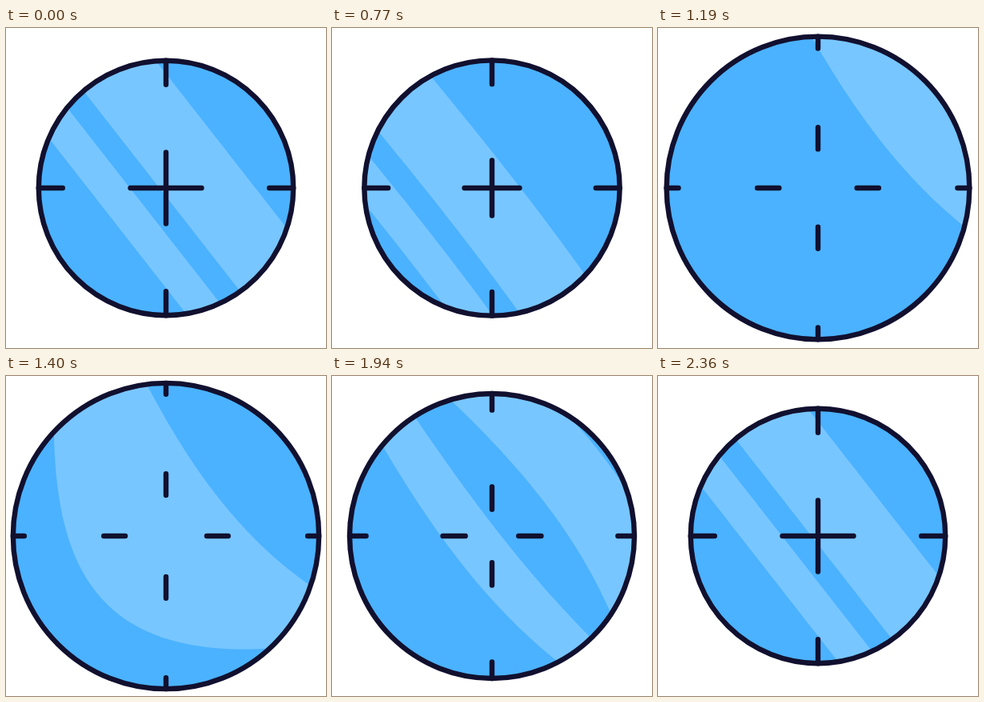
These frames come from a looping animation (400x400 px, 2390 ms). An HTML page with a canvas:

```html
<!DOCTYPE html>
<html lang="en">
<head>
<meta charset="utf-8">
<title>Scope</title>
<style>
  html, body { margin: 0; width: 100%; height: 100%; overflow: hidden; background: #fff; }
  canvas { display: block; width: 400px; height: 400px; }
</style>
</head>
<body>
<canvas id="stage" width="400" height="400"></canvas>
<script>
const ctx = document.getElementById('stage').getContext('2d');
const LOOP = 2390, STEP = 30, START = 500, SETTLED = 2360;
const INK = '#11102f', GLASS = '#4bb2ff', SHINE = '#78c6ff';
const CAP = 3.2;
const FAR = 215; // distance at which an edge lies outside the lens
const TILT = Math.atan2(0.788, 0.616);

const clamp = x => Math.min(1, Math.max(0, x));
const smooth = x => x * x * (3 - 2 * x);

// Timing curve cubic-bezier(.45, 0, .02, 1)
function ease(x) {
  let lo = 0, hi = 1;
  for (let i = 0; i < 24; i++) {
    const s = (lo + hi) / 2, r = 1 - s;
    if (1.35 * s * r * r + 0.06 * s * s * r + s * s * s < x) lo = s; else hi = s;
  }
  return smooth(lo);
}

// Each motion gives an edge's distance from the centre and its bend.

// Accelerates away from the resting place, then eases back in from the far side
const resting = (rest, enter, bend) => t => {
  if (t < 1200) {
    const q = Math.pow(Math.max(0, t - START) / 450, 2.5);
    return [rest - FAR * q, -0.0004 * q];
  }
  const left = Math.pow(Math.max(0, SETTLED - t) / (SETTLED - enter), 3);
  return [rest + (FAR - rest) * left, bend * left];
};

// Crosses the lens at 1 px per ms, bending more on the way
const passing = enter => t =>
  [FAR - (t - enter), 0.0029 * Math.pow(clamp((t - enter) / 327), 1.5)];

const shines = [
  [resting(-77, 1417, 0.006), resting(-35.5, 1613, 0.0015)],
  [resting(-6.5, 1780, -0.0016), resting(88, 1875, -0.0011)],
  [passing(1073), passing(1266)]
];

function edge([v, bend], dir) {
  for (let a = -200; a <= 200; a += 8) {
    const s = a * dir;
    ctx.lineTo(s, -(v + bend * s * s * (1 + s / 900)));
  }
}

function disc(r) {
  ctx.beginPath();
  ctx.arc(0, 0, r, 0, 7);
}

// The same stroke on all four sides
function marks(from, to) {
  ctx.beginPath();
  for (const [x, y] of [[1, 0], [0, 1], [-1, 0], [0, -1]]) {
    ctx.moveTo(x * from, y * from);
    ctx.lineTo(x * to, y * to);
  }
  ctx.stroke();
}

function draw(t) {
  const grow = ease(clamp(Math.min((t - 710) / 735, (2177 - t) / 720)));
  const shrink = smooth(clamp(Math.min((t - START) / 180, (SETTLED - t) / 200)));
  const r = 159.2 + 32 * grow;

  ctx.setTransform(1, 0, 0, 1, 0, 0);
  ctx.fillStyle = '#fff';
  ctx.fillRect(0, 0, 400, 400);
  ctx.translate(200, 200);

  ctx.save();
  disc(r);
  ctx.clip();
  ctx.fillStyle = GLASS;
  ctx.fillRect(-200, -200, 400, 400);
  ctx.rotate(TILT);
  ctx.fillStyle = SHINE;
  for (const [lower, upper] of shines) {
    ctx.beginPath();
    edge(lower(t), 1);
    edge(upper(t), -1);
    ctx.fill();
  }
  ctx.restore();

  ctx.strokeStyle = INK;
  ctx.lineCap = 'round';
  ctx.lineWidth = CAP * 2;
  disc(r);
  ctx.stroke();
  marks(126 + 48 * grow + CAP, r);
  marks(51 * Math.pow(grow, 0.8),
    47.7 - 10.7 * shrink + 48 * grow - 4 * Math.pow(grow, 4) - CAP);
}

const begin = performance.now();

function loop() {
  const t = (performance.now() - begin) % LOOP;
  draw(START + Math.max(0, Math.floor((t - START) / STEP)) * STEP);
  requestAnimationFrame(loop);
}
loop();
</script>
</body>
</html>
```
